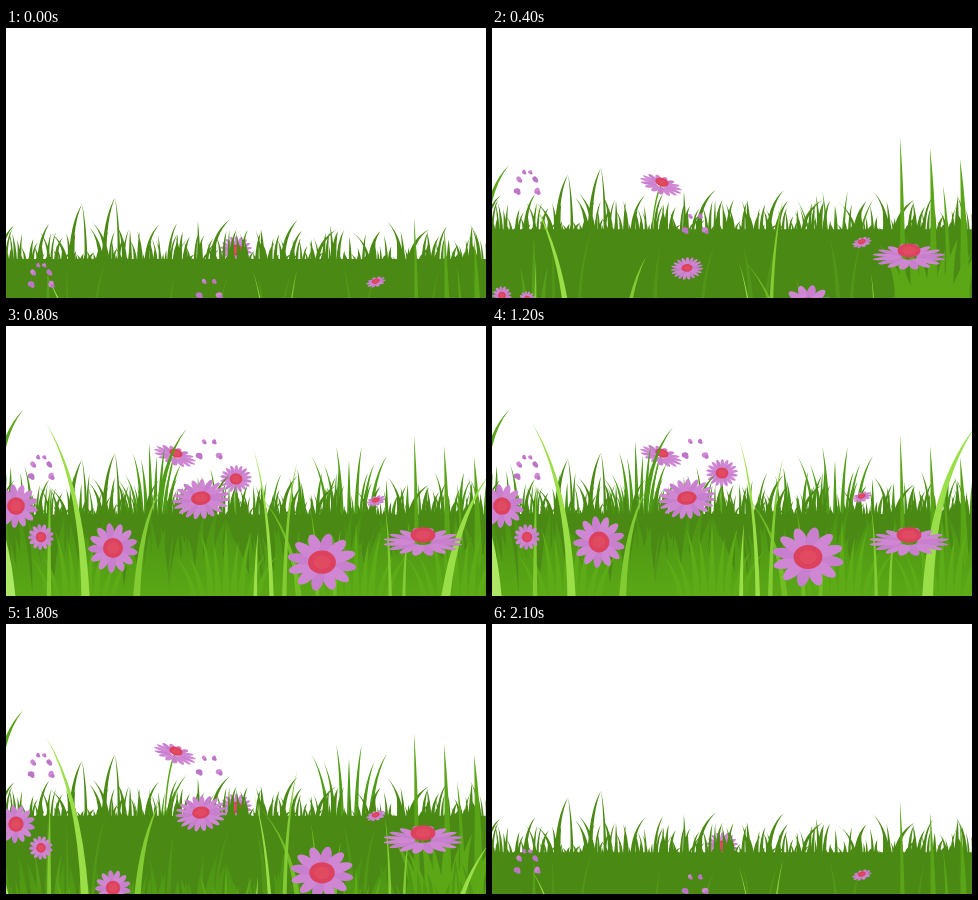
These frames come from a looping animation (480 by 270 pixels, 2.2 s). An HTML page with a canvas:

```html
<!DOCTYPE html>
<html lang="en">
<head>
<meta charset="utf-8">
<title>Meadow</title>
<style>
  html, body { margin: 0; width: 100%; height: 100%; overflow: hidden; background: #fff; }
  canvas { display: block; width: 480px; height: 270px; }
</style>
</head>
<body>
<canvas id="stage" width="480" height="270"></canvas>
<script>
const ctx = document.getElementById('stage').getContext('2d');
const LOOP = 2200, STEP = 100, FLOOR = 300;
const DARK = '#4a8a14', LEAF = '#4f9c16', MID = '#5aa517', LIGHT = '#9ade48', PALE = '#aee765';
const PINK = '#cf87d3', PLUM = '#bd76c6', RED = '#dc415d', ROSE = '#e04b62';

// Growth time: forward, hold, then back at double speed
const growth = t => t < 1600 ? Math.min(t, 1200) : 30 + 2 * (2100 - t);

// Remaining drop below the resting place
const out = (drop, dur) => p => drop * Math.max(0, 1 - p / dur) ** 2;
const line = (drop, dur) => p => drop * Math.max(0, 1 - p / dur);
const inOut = (drop, dur, start = 0) => p => {
  const u = Math.min(1, Math.max(0, (p - start) / dur));
  return drop * (1 + Math.cos(Math.PI * u)) / 2;
};

function rng(seed) {
  return () => (seed = (seed * 16807) % 2147483647) / 2147483647;
}

// Upright at the foot, bending towards the tip
function blade(path, x, y, tx, ty, w) {
  const cy = ty + (y - ty) * 0.32;
  path.moveTo(x - w / 2, y);
  path.quadraticCurveTo(x - w * 0.3, cy, tx, ty);
  path.quadraticCurveTo(x + w * 0.3, cy + 2, x + w / 2, y);
  path.closePath();
  return path;
}

const stalk = (x, tx, ty, w) => blade(new Path2D(), x, FLOOR, tx, ty, w);

// Random blades along a strip
function grass({ n, x0 = -6, x1 = 486, y = FLOOR, low, high, lean, w, seed }) {
  const path = new Path2D(), rnd = rng(seed);
  for (let i = 0; i < n; i++) {
    const x = x0 + (x1 - x0) * (i + rnd()) / n;
    const h = low + (high - low) * rnd() ** 1.5;
    blade(path, x, y, x + (rnd() - 0.5) * lean, y - h, w * (0.7 + 0.6 * rnd()));
  }
  return path;
}

// Blades fanning out from one place, lower at the sides
function tuft({ x, y = FLOOR, n, spread, h, w, sag = 0.4 }) {
  const path = new Path2D();
  for (let i = 0; i < n; i++) {
    const u = 2 * i / (n - 1) - 1;
    const uneven = i % 2 ? 0.85 : 1;
    blade(path, x + u * spread * 0.55, y, x + u * spread, y - h * uneven * (1 - sag * u * u), w);
  }
  return path;
}

function disc(x, y, rx, ry, rot, color) {
  ctx.fillStyle = color;
  ctx.beginPath();
  ctx.ellipse(x, y, rx, ry, rot, 0, 7);
  ctx.fill();
}

function flower({ x, y, rx, ry = rx, n = 13, core = 0.4, rot = 0, lift = 0, stem }, size) {
  ctx.save();
  ctx.translate(x, y);
  if (stem) {
    ctx.strokeStyle = MID;
    ctx.lineWidth = 1.5;
    ctx.beginPath();
    ctx.moveTo(0, 0);
    ctx.quadraticCurveTo(stem, 25, stem, 130);
    ctx.stroke();
  }
  ctx.scale(size, size);
  ctx.rotate(rot);
  ctx.save();
  ctx.scale(1, ry / rx);
  for (let i = 0; i < n; i++) {
    const a = 0.2 + i * 2 * Math.PI / n;
    const mid = rx * 0.6;
    disc(mid * Math.cos(a), mid * Math.sin(a), rx * 0.4, rx * 2.1 / n, a, i % 3 ? PINK : '#c77fce');
  }
  ctx.restore();
  const cx = rx * core, cy = Math.max(ry * core, cx * 0.62);
  disc(0, -lift, cx, cy, 0, RED);
  disc(0, -lift, cx * 0.62, cy * 0.6, 0, ROSE);
  ctx.restore();
}

// Loose petals along an arch
function petals(x, y, rx, ry, n) {
  for (let i = 0; i < n; i++) {
    const a = Math.PI * i / (n - 1);
    const r = 1.6 + 1.7 * Math.abs(Math.cos(a));
    const px = x - rx * Math.cos(a), py = y - ry * Math.sin(a);
    disc(px, py, r, r * 0.8, i, i % 2 ? PINK : PLUM);
    disc(px + r * 0.5, py + r * 0.6, r * 0.6, r * 0.6, 0, PLUM);
  }
}

const layers = [];
const add = (drop, draw) => layers.push({ drop, draw });
const fill = (drop, path, color) => add(drop, () => { ctx.fillStyle = color; ctx.fill(path); });
const bloom = (drop, opts) => add(drop, () => flower(opts, 1));
// Opens while it rises
const bud = (drop, opts) => add(drop, left => flower(opts, Math.max(0.2, 1 - left / 155)));

// Behind the meadow
const late = inOut(110, 430, 400);
fill(late, grass({ n: 110, y: 198, low: 18, high: 60, lean: 18, w: 4, seed: 77 }), '#4a9415');
bloom(inOut(75, 550, 350), { x: 230, y: 147, rx: 16, ry: 14, n: 18, stem: -2 });
bloom(out(363, 550), { x: 169, y: 130, rx: 22, ry: 9, n: 15, rot: 0.32, core: 0.31, lift: 3, stem: -12 });
fill(late, tuft({ x: 147, y: 205, n: 10, spread: 36, h: 90, w: 5 }), LEAF);
fill(late, blade(new Path2D(), 153, 205, 181, 101, 6), LEAF);
fill(out(300, 640), tuft({ x: 343, y: 215, n: 7, spread: 38, h: 95, w: 5, sag: 0.1 }), LEAF);
fill(out(300, 690), blade(new Path2D(), -8, 170, 17, 84, 7), MID);

// Main meadow
const rise = out(43, 900);
const meadow = grass({ n: 200, y: 192, low: 8, high: 34, lean: 14, w: 3.4, seed: 4211 });
meadow.addPath(grass({ n: 24, y: 194, low: 34, high: 46, lean: 44, w: 4.5, seed: 58 }));
for (const x of [76, 109]) {
  const top = 133 - (x - 76) / 5;
  blade(meadow, x - 11, 194, x, top, 5);
  blade(meadow, x + 4, 194, x, top, 3);
}
meadow.rect(-2, 188, 484, 140);
fill(rise, meadow, DARK);
fill(rise, grass({ n: 11, low: 94, high: 112, lean: 36, w: 6, seed: 31 }), '#529618');
fill(rise, tuft({ x: 42, n: 3, spread: 14, h: 125, w: 7 }), '#569d1a');

// Right tuft
const spring = out(80, 400);
for (let i = 0; i < 3; i++) fill(spring, stalk(411 + 31 * i, 408 + 30 * i, 109 + 11 * i, 7 + 2 * i), MID);
fill(spring, stalk(457, 451, 157, 7), MID);
fill(spring, tuft({ x: 440, n: 9, spread: 52, h: 92, w: 16, sag: 0.1 }), '#5ba716');

// Near grass
const near = inOut(110, 470, 380);
const shade = ctx.createLinearGradient(0, 185, 0, 270);
shade.addColorStop(0, '#4b9213');
shade.addColorStop(1, '#5aa816');
fill(near, grass({ n: 75, low: 90, high: 122, lean: 30, w: 17, seed: 903 }), shade);
for (const x of [75, 220, 350, 450]) {
  fill(near, tuft({ x, n: 9, spread: 52, h: 106, w: 9, sag: 0.3 }), '#5cab17');
}

// Light blades
const steady = inOut(150, 800);
fill(steady, stalk(80, 40, 97, 9), LIGHT);
fill(steady, stalk(43, 44, 157, 5), '#83cb33');
fill(near, stalk(4, -7, 190, 15), PALE);
const arcs = inOut(130, 800);
fill(arcs, stalk(130, 154, 164, 8), '#83cb33');
fill(arcs, stalk(294, 253, 169, 7), '#72bc26');
fill(arcs, tuft({ x: 320, n: 2, spread: 15, h: 190, w: 5 }), '#72bc26');
fill(arcs, tuft({ x: 391, n: 2, spread: 12, h: 200, w: 4 }), '#83cb33');
fill(inOut(130, 600, 300), stalk(266, 247, 113, 5), LIGHT);
fill(inOut(130, 600, 300), stalk(249, 252, 198, 5), LIGHT);
fill(out(110, 1000), stalk(278, 291, 132, 5), '#83cb33');
fill(inOut(170, 620, 400), stalk(435, 484, 100, 12), LIGHT);

// Flowers in front
bloom(line(83, 840), { x: 370, y: 171, rx: 10, ry: 5, n: 10, rot: -0.3, lift: 1 });
bud(inOut(130, 820), { x: 195, y: 173, rx: 29, ry: 20, n: 19, core: 0.34, rot: -0.12, lift: 1 });
bud(inOut(172, 810), { x: 10, y: 180, rx: 22 });
bud(inOut(120, 800), { x: 35, y: 211, rx: 13 });
bud(inOut(90, 480, 400), { x: 107, y: 216, rx: 26 });
bud(out(130, 1000), { x: 316, y: 231, rx: 36, ry: 30, n: 12 });
bud(out(106, 615), { x: 417, y: 216, rx: 40, ry: 14, n: 16, core: 0.31, lift: 7 });

add(out(106, 615), () => petals(35, 150, 10, 20, 6));
add(inOut(138, 830), () => petals(203, 129, 10, 16, 4));

function render(now) {
  const t = Math.floor((now % LOOP) / STEP) * STEP;
  const p = growth(t);
  ctx.fillStyle = '#fff';
  ctx.fillRect(0, 0, 480, 270);
  for (const { drop, draw } of layers) {
    const left = drop(p);
    ctx.save();
    ctx.translate(0, left);
    draw(left);
    ctx.restore();
  }
}

function tick() {
  render(performance.now());
  requestAnimationFrame(tick);
}
tick();
</script>
</body>
</html>
```
